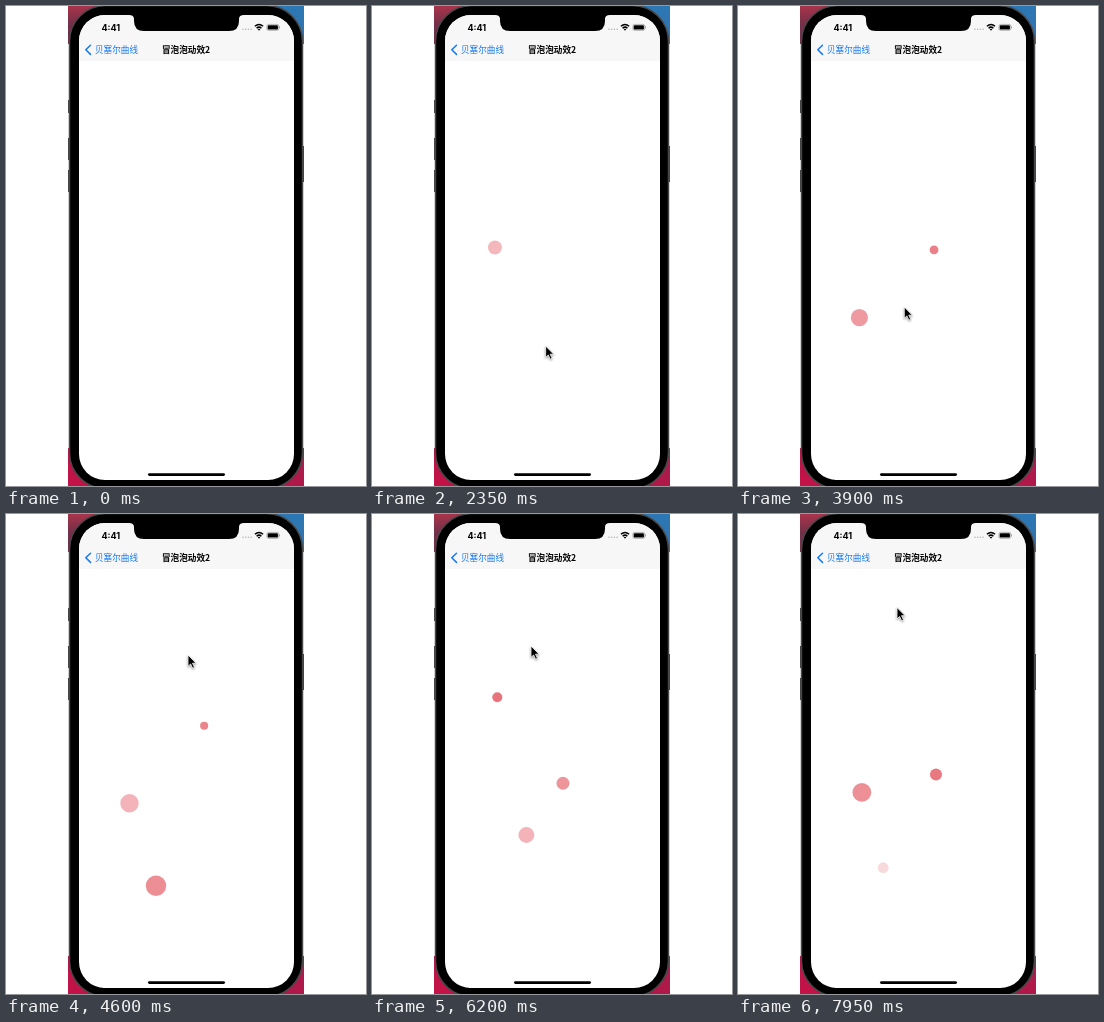
An HTML page for the animation above (8000 ms loop, 360 by 480 pixels).

```html
<!DOCTYPE html>
<html lang="zh">
<head>
<meta charset="utf-8">
<title>冒泡泡动效2</title>
<style>
  html, body { margin: 0; width: 100%; height: 100%; overflow: hidden; background: #fff; }
  svg { display: block; width: 360px; height: 480px; }
  text { font-family: "Noto Sans CJK SC", "Noto Sans CJK", sans-serif; font-size: 8.6px; }
  .time { font: 700 9px Inter, sans-serif; }
  .title { font-weight: 700; }
  #cursor { filter: drop-shadow(0 1px 1px #0006); }
</style>
</head>
<body>
<svg viewBox="0 0 360 480">
  <defs>
    <linearGradient id="left" x2="0" y2="1">
      <stop stop-color="#a9344b"/>
      <stop offset=".04" stop-color="#713049"/>
      <stop offset="1" stop-color="#c21347"/>
    </linearGradient>
    <linearGradient id="right" x2="0" y2="1">
      <stop stop-color="#2b78b4"/>
      <stop offset="1" stop-color="#b01848"/>
    </linearGradient>
    <clipPath id="screen"><rect x="73" y="9" width="215" height="465" rx="26"/></clipPath>
  </defs>

  <!-- wallpaper and phone body -->
  <path d="M62 0h38v38H62zM62 442h38v38H62z" fill="url(#left)"/>
  <path d="M260 0h38v38h-38zM260 442h38v38h-38z" fill="url(#right)"/>
  <path d="M62.5 94v13m0 25v22m0 10v22M297.5 140v36" stroke="#444"/>
  <rect x="63.5" y="-.5" width="233" height="483" rx="36" stroke="#48484a" stroke-width="1.5"/>

  <!-- screen -->
  <g clip-path="url(#screen)">
    <rect x="73" y="9" width="215" height="465" fill="#fff"/>
    <rect x="73" y="9" width="215" height="46" fill="#f7f7f7"/>
  </g>
  <path d="M123 8.5V9q5 0 5 4v2q0 10 10 10h85q10 0 10-10v-2q0-4 5-4v-.5z"/>
  <text class="time" x="95.5" y="24.6">4:41</text>
  <path d="M237 23.3h9" stroke="#b5b5b7" stroke-width="1.6" stroke-linecap="round" stroke-dasharray="0 2.7"/>
  <path d="M248.9 20.3q4.1-3.6 8.2 0m-6.5 1.9q2.4-2.1 4.8 0" fill="none" stroke="#000" stroke-width="1.5"/>
  <path d="M251.7 23.3q1.3-1 2.6 0L253 24.7z"/>
  <rect x="260.9" y="18.4" width="11.8" height="6" rx="1.6" fill="#fff" stroke="#888" stroke-width=".6"/>
  <rect x="261.7" y="19.2" width="10.2" height="4.4" rx=".9"/>
  <path d="M273.5 20.4v2" stroke="#888" stroke-width=".8"/>
  <path d="M84.5 39.2l-4.7 4.6 4.7 4.6" fill="none" stroke="#1479f2" stroke-width="1.5" stroke-linecap="round" stroke-linejoin="round"/>
  <text x="89" y="47.1" fill="#1479f2">贝塞尔曲线</text>
  <text class="title" x="156" y="47.1">冒泡泡动效2</text>

  <g id="bubbles" fill="#e24b55"></g>
  <rect x="142" y="467.2" width="77" height="2.8" rx="1.4"/>
  <path id="cursor" d="M0 0v11.4L2.6 9l2 4.2 1.9-.9-2-4.1h3.6z" stroke="#fff" stroke-width=".8"/>
</svg>
<script>
const LOOP = 8000, STEP = 50, FADE_IN = 200, FADE_OUT = 300, TRAVEL = 800;

// Rates are per second: speed upwards, drift sideways, grow in radius, fade in opacity
const bubble = (born, life, x, y, speed, r, alpha, { drift = 3, grow = 0, fade = .08 } = {}) =>
  ({ born, life, x, y, speed, r, alpha, drift, grow, fade });

const bubbles = [
  bubble(900, 2800, 118.6, 269.6, 19.4, 5.1, .83, { grow: 1.3, fade: .3 }),
  bubble(2550, 2600, 192, 306, 46, 5.1, .74, { grow: -.5, fade: .03 }),
  bubble(3700, 1900, 120.8, 318, 32, 8.4, .6, { grow: .9, fade: .2 }),
  bubble(4000, 1500, 148.2, 391, 32, 10.2, .66, { fade: .05 }),
  bubble(5700, 2150, 154, 340.5, 39, 7, .51, { drift: .7, grow: 1.9, fade: .18 }),
  bubble(5300, 1650, 122.6, 221, 42, 5, .85),
  bubble(5450, 1550, 188.7, 300, 41, 6, .65, { grow: .6 }),
  bubble(6650, 2000, 192, 304, 33.5, 6, .85, { drift: 4.6 }),
  bubble(6600, 1100, 121.9, 291, 33.5, 5.8, .72),
  bubble(7500, 2000, 122.5, 293.5, 33.5, 9.4, .65),
  bubble(7850, 2000, 144.9, 357, 33, 5.4, .42)
];

// Pointer stops: arrival time and tip
const stops = [
  [1350, 195, 289], [2700, 159, 375], [4400, 182, 141],
  [5700, 159, 132], [7000, 107.5, 67], [7650, 159, 93.5]
];

const clamp = v => Math.max(0, Math.min(1, v));
const smooth = p => p * p * (3 - 2 * p);
const layer = document.getElementById("bubbles");
const cursor = document.getElementById("cursor");
const dots = bubbles.map(() =>
  layer.appendChild(document.createElementNS("http://www.w3.org/2000/svg", "circle")));

function set(el, attrs) {
  for (const name in attrs) el.setAttribute(name, attrs[name]);
}

function drawBubble(b, dot, t) {
  const age = t - b.born, s = age / 1000;
  const shown = clamp(age / FADE_IN) * clamp((b.life - age) / FADE_OUT);
  set(dot, {
    cx: b.x + b.drift * s,
    cy: b.y - b.speed * s,
    r: Math.max(0, b.r + b.grow * s),
    opacity: shown * clamp(b.alpha - b.fade * s)
  });
}

function drawPointer(t) {
  let x = 300, y = 330, from = 0;
  for (const [at, tx, ty] of stops) {
    const time = Math.min(TRAVEL, at - from);
    const p = smooth(clamp((t - at + time) / time));
    x += (tx - x) * p;
    y += (ty - y) * p;
    from = at;
  }
  set(cursor, {
    visibility: x < 284 ? "visible" : "hidden",
    transform: `translate(${x} ${y})`
  });
}

function draw(t) {
  bubbles.forEach((b, i) => drawBubble(b, dots[i], t));
  drawPointer(t);
}

const start = performance.now();
function tick() {
  const t = (performance.now() - start) % LOOP;
  draw(Math.floor(t / STEP) * STEP);
  requestAnimationFrame(tick);
}
tick();
</script>
</body>
</html>
```
